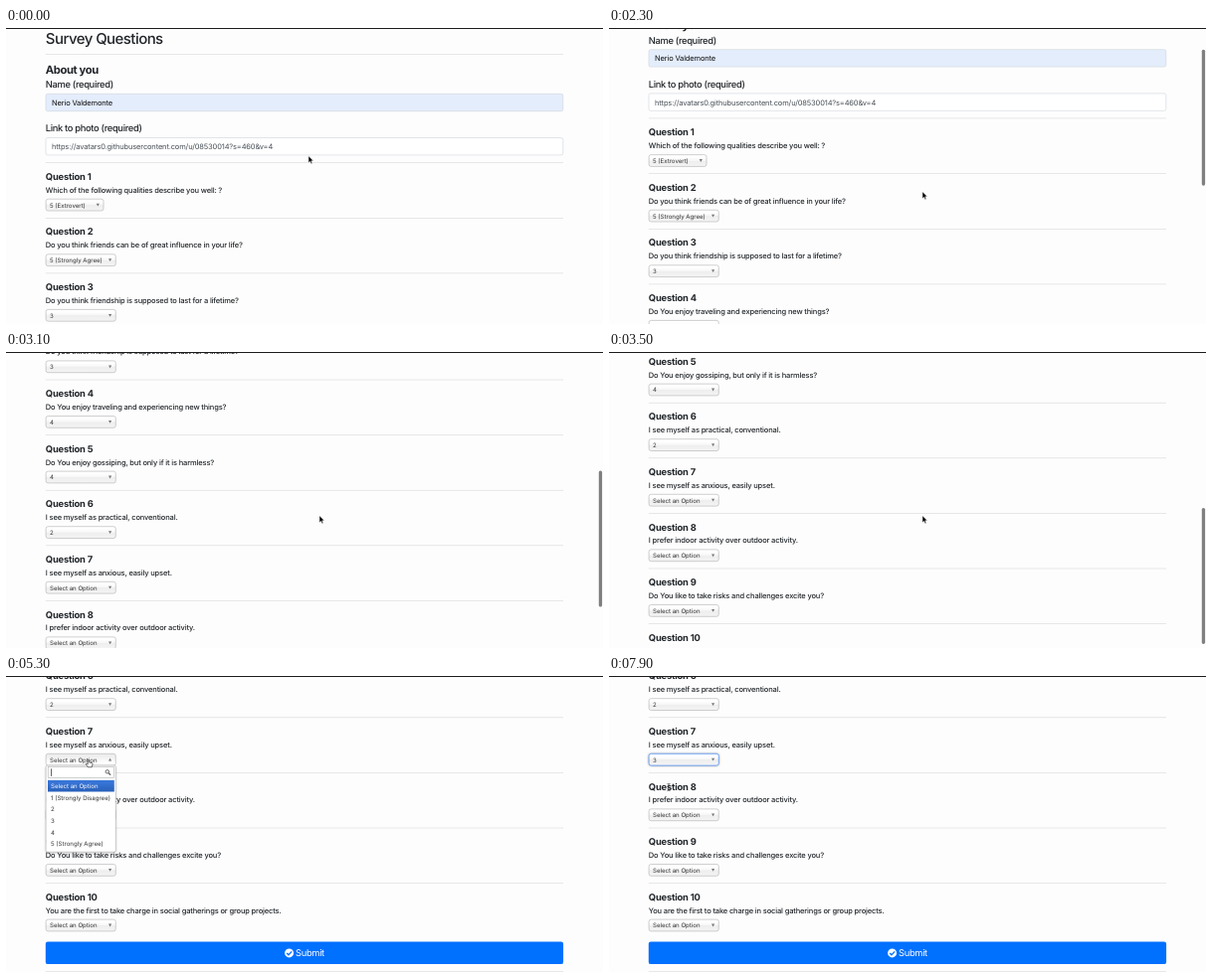
An HTML page for the animation above (8 s loop, 600 by 298 pixels).

```html
<!DOCTYPE html>
<html lang="en">
<head>
<meta charset="utf-8">
<title>Survey Questions</title>
<style>
  html, body { margin: 0; width: 100%; height: 100%; overflow: hidden; background: #fdfdfd; }
  svg { display: block; width: 100%; height: 100%; }
  text { font-family: Inter, "Open Sans", sans-serif; text-rendering: geometricPrecision; white-space: pre; }
  .drop { filter: drop-shadow(0 1.5px 1.2px rgba(0, 0, 0, .18)); }
  .glow { filter: drop-shadow(0 0 1.2px rgba(0, 0, 0, .35)); }
</style>
</head>
<body>
<svg viewBox="0 0 600 298">
  <defs>
    <linearGradient id="closed" x2="0" y2="1">
      <stop offset=".2" stop-color="#fff"/><stop offset=".5" stop-color="#f6f6f6"/>
      <stop offset=".52" stop-color="#eee"/><stop offset="1" stop-color="#f4f4f4"/>
    </linearGradient>
    <linearGradient id="opened" x2="0" y2="1">
      <stop offset=".2" stop-color="#eee"/><stop offset=".8" stop-color="#fff"/>
    </linearGradient>
    <linearGradient id="picked" x2="0" y2="1">
      <stop offset=".2" stop-color="#3875d7"/><stop offset=".9" stop-color="#2a62bc"/>
    </linearGradient>
  </defs>
  <g id="scene"></g>
</svg>
<script>
const LOOP = 8000, STEP = 100;
const LEFT = 39.8, WIDTH = 520.3, PITCH = 55.6;
const OPEN = 5300, TYPED = 6400, CHOSEN = 7800;
const UNSET = 'Select an Option';
const OPTIONS = [UNSET, '1 (Strongly Disagree)', '2', '3', '4', '5 (Strongly Agree)'];
const QUESTIONS = [
  ['Which of the following qualities describe you well: ?', '5 (Extrovert)'],
  ['Do you think friends can be of great influence in your life?', '5 (Strongly Agree)'],
  ['Do you think friendship is supposed to last for a lifetime?', '3'],
  ['Do You enjoy traveling and experiencing new things?', '4'],
  ['Do You enjoy gossiping, but only if it is harmless?', '4'],
  ['I see myself as practical, conventional.', '2'],
  ['I see myself as anxious, easily upset.', UNSET],
  ['I prefer indoor activity over outdoor activity.', UNSET],
  ['Do You like to take risks and challenges excite you?', UNSET],
  ['You are the first to take charge in social gatherings or group projects.', UNSET]
];

// Keys are [time, value, slope per second], joined by cubic Hermite curves.
const SCROLL = [[1900, 0, 0], [2000, .5, 5], [2800, 198, 270], [3500, 362.5, 200], [4000, 427.5, 0]];
// Keys are [time, x, y], joined by straight lines.
const POINTER = [[900, 304, 128.7], [1400, 315, 164.7], [4100, 315, 164.7],
  [5000, 83, 84], [6800, 83, 84], [7700, 60, 112]];

function span(keys, t) {
  const last = keys.length - 1;
  if (t <= keys[0][0]) return [keys[0], keys[0], 0];
  if (t >= keys[last][0]) return [keys[last], keys[last], 0];
  const i = keys.findIndex(key => key[0] > t);
  const [a, b] = [keys[i - 1], keys[i]];
  return [a, b, (t - a[0]) / (b[0] - a[0])];
}

function scrollAt(t) {
  const [a, b, u] = span(SCROLL, t), d = (b[0] - a[0]) / 1000, v = 1 - u;
  return a[1] * v * v * (1 + 2 * u) + b[1] * u * u * (3 - 2 * u)
    + d * u * v * (a[2] * v - b[2] * u);
}

function pointerAt(t) {
  const [a, b, u] = span(POINTER, t);
  return [a[1] + (b[1] - a[1]) * u, a[2] + (b[2] - a[2]) * u];
}

const rect = (x, y, w, h, attrs) => `<rect x="${x}" y="${y}" width="${w}" height="${h}" ${attrs}/>`;
const rule = y => rect(LEFT, y - .3, WIDTH, .6, 'fill="#000" fill-opacity=".15"');

// Text is placed by the middle of its capitals.
function label(x, middle, string, size, { weight = 400, gap = 0, fill = '#212529', more = '' } = {}) {
  return `<text x="${x}" y="${middle + size * .364}" font-size="${size}" font-weight="${weight}"
    letter-spacing="${gap}em" fill="${fill}" ${more}>${string}</text>`;
}

function field(middle, string, fill, color) {
  return rect(LEFT + .2, middle - 8.7, WIDTH - .5, 17.4, `rx="1.9" fill="${fill}" stroke="#ced4da" stroke-width=".6"`)
    + label(46, middle + .2, string, 7.5, { gap: -.02, fill: color });
}

function select(middle, string, { open = false, focus = false } = {}) {
  const width = string === '5 (Extrovert)' ? 58.5 : 70.8;
  const x = LEFT + width - 6, d = open ? -1.4 : 1.4;
  return rect(LEFT + .3, middle - 5.9, width - .6, 11.8, `rx="2.2" fill="url(#${open ? 'opened' : 'closed'})"
      stroke="${focus ? '#5897fb' : '#aaa'}" stroke-width="${focus ? .8 : .55}" ${focus ? 'class="glow"' : ''}`)
    + label(44, middle + .2, string, 6.1, { fill: '#333' })
    + `<path d="M${x - 1.6} ${middle - d}h3.2l-1.6 ${2 * d}z" fill="#777"/>`;
}

function dropdown(middle, t) {
  const typed = t >= TYPED, rows = typed ? ['3'] : OPTIONS, top = middle + 5.9, pitch = 11.7;
  const caretOn = Math.floor((t - (typed ? TYPED : OPEN)) / 500) % 2 === 0;
  let out = rect(LEFT + .3, top, 70.2, 16.9 + rows.length * pitch,
    'rx="1.6" fill="#fff" stroke="#aaa" stroke-width=".55" class="drop"');
  out += rect(42.2, top + 1.6, 66.4, 11, 'fill="#fff" stroke="#aaa" stroke-width=".55"');
  out += `<g fill="none" stroke="#444"><circle cx="101.8" cy="${top + 6.2}" r="1.7" stroke-width=".8"/>
    <path d="M103.1 ${top + 7.5}l2 2" stroke-width="1.1"/></g>`;
  if (typed) out += label(45, top + 7.2, '3', 6.1, { fill: '#222' });
  if (caretOn) out += rect(typed ? 49.4 : 45, top + 3.2, .6, 7.6, 'fill="#000"');
  rows.forEach((row, i) => {
    const y = top + 20.6 + i * pitch;
    if (!i) out += rect(42, y - 5.8, 66.8, 11.6, 'fill="url(#picked)"');
    out += label(45, y, row, 6.1, {
      fill: i ? '#333' : '#fff', more: typed ? 'text-decoration="underline"' : ''
    });
  });
  return out;
}

function question([string, answer], i, t) {
  const y = 149.4 + i * PITCH, seventh = i === 6;
  const chosen = seventh && t >= CHOSEN, open = seventh && t >= OPEN && !chosen;
  return label(LEFT, y, `Question ${i + 1}`, 9.375, { weight: 700, gap: -.02 })
    + label(LEFT, y + 13.6, string, 7.5, { weight: 500, gap: -.02 })
    + select(y + 28.7, chosen ? '3' : answer, { open, focus: chosen })
    + (i < 9 ? rule(y + 41.9) : '');
}

function page(t) {
  const heading = { weight: 500, gap: -.037 };
  const open = t >= OPEN && t < CHOSEN;
  return label(LEFT, 10.5, 'Survey Questions', 15, heading)
    + rule(26.3)
    + label(LEFT, 41.5, 'About you', 11.25, { weight: 700, gap: -.035 })
    + label(LEFT, 57, 'Name (required)', 9.375, heading)
    + field(75, 'Nerio Valdemonte', '#e4edfc', '#111')
    + label(LEFT, 101, 'Link to photo (required)', 9.375, heading)
    + field(119.2, 'https://avatars0.githubusercontent.com/u/08530014?s=460&amp;v=4', '#fff', '#495057')
    + rule(135.5)
    + QUESTIONS.map((entry, i) => question(entry, i, t)).join('')
    + rect(LEFT, 695, WIDTH, 22.6, 'rx="2.2" fill="#0070ff"')
    + '<circle cx="284.6" cy="706.4" r="4.5" fill="#fff"/>'
    + '<path d="M282.2 706.5l1.8 1.8 3.2-3.4" fill="none" stroke="#0070ff" stroke-width="1.3"/>'
    + label(291, 706.4, 'Submit', 9.375, { gap: -.035, fill: '#fff' })
    + rule(725)
    + (open ? dropdown(149.4 + 6 * PITCH + 28.7, t) : '');
}

function scrollbar(t, scroll) {
  if (t < 2100) return '';
  const opacity = Math.max(0, Math.min(1, (4800 - t) / 300));
  return rect(595.8, 2.7 + scroll * .4255, 3.3, 137, `rx="1.6" fill="#7f7f7f" opacity="${opacity}"`);
}

const CURSORS = {
  arrow: '<path d="M0 0V7.1L1.6 5.6 2.7 8.1 3.9 7.6 2.8 5.1H5Z" fill="#000" stroke="#fff" stroke-width=".5"/>',
  hand: `<path d="M-.8 .6Q0-.5 .7 .6V3L3.4 3.6Q4.2 3.9 4 5L3.2 7.8H-.6L-2.8 4.7Q-2.7 3.6-1.7 4.2L-.8 5Z"
    fill="#fff" stroke="#111" stroke-width=".6"/>`,
  beam: `<path d="M-1.5-3.6Q0-3.6 0-2.6 0-3.6 1.5-3.6M0-2.6V2.6M-1.5 3.6Q0 3.6 0 2.6 0 3.6 1.5 3.6"
    fill="none" stroke="#333" stroke-width=".7"/>`
};

function cursor(t) {
  const [x, y] = pointerAt(t);
  let kind = 'arrow';
  if (t >= CHOSEN || (t > 6800 && y > 91 && y < 103)) kind = 'beam';
  else if (t >= 5000) kind = 'hand';
  return `<g transform="translate(${x} ${y})">${CURSORS[kind]}</g>`;
}

const scene = document.getElementById('scene');
let shown = -1;

function tick() {
  const t = Math.floor(performance.now() % LOOP / STEP) * STEP;
  if (t !== shown) {
    const scroll = scrollAt(t);
    scene.innerHTML = `<g transform="translate(0 ${-scroll})">${page(t)}</g>`
      + scrollbar(t, scroll) + rect(0, 0, 600, 1, 'fill="#1c1c1c"') + cursor(t);
    shown = t;
  }
  requestAnimationFrame(tick);
}
tick();
</script>
</body>
</html>
```
